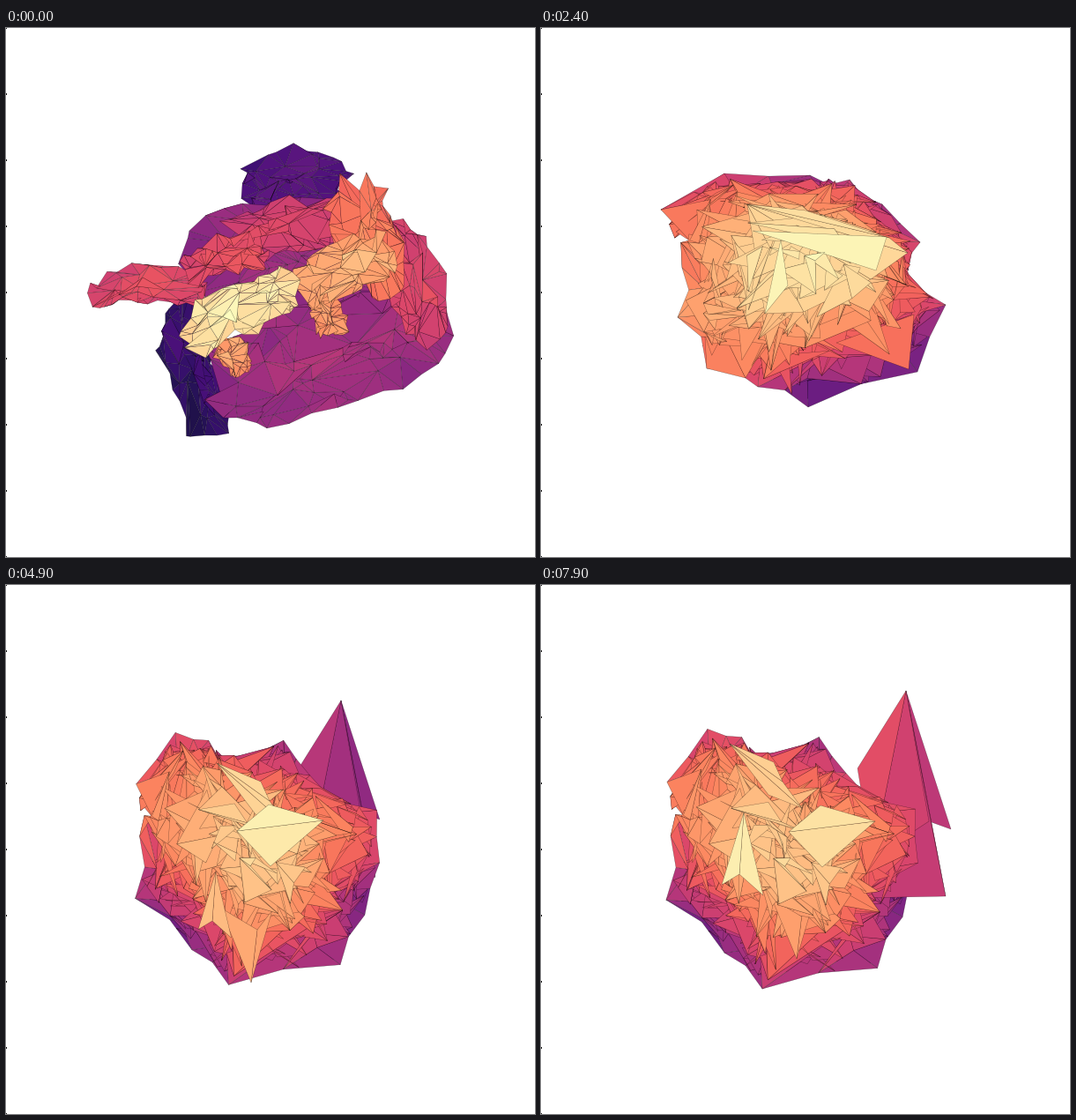
Recreate the animation shown at these times as a matplotlib script. Size 600x600 px, loop 8000 ms.

```python
import numpy as np
import matplotlib.pyplot as plt
from matplotlib.animation import FuncAnimation
from matplotlib.collections import PolyCollection
from matplotlib.tri import Triangulation

SIZE, FRAMES, STEP = 600, 80, 100
KEYS = [0, 7, 24, 39, 49, 63, 79]            # poses 0 to 6
SWELL = [.04, .19, .09, .03, .02, .03]       # bulge between poses
GOLDEN = 2.39996

# opening pose: level, half width, then start, control and end of a bent spine
RIDGES = [
    (.42, 66, 205, 272, 330, 232, 460, 285),
    (.26, 31, 272, 192, 325, 155, 388, 182),
    (.57, 31, 245, 258, 310, 212, 392, 222),
    (.62, 17, 204, 275, 250, 250, 300, 262),
    (.59, 31, 420, 225, 475, 270, 478, 352),
    (.72, 34, 395, 180, 405, 235, 437, 305),
    (.60, 19, 98, 310, 160, 272, 227, 305),
    (.19, 29, 200, 315, 200, 380, 240, 464),
    (.44, 60, 238, 415, 352, 365, 497, 340),
    (.95, 29, 207, 360, 270, 300, 332, 298),
    (.82, 31, 332, 298, 394, 270, 440, 252),
    (.79, 15, 248, 350, 255, 370, 272, 392),
    (.78, 17, 355, 310, 370, 325, 372, 347)]

# ball poses: bright hub, then 14 corners clockwise from the left; x, y, level
EARLY = [(285, 312, .73),
         (120, 242, .78), (150, 250, .7), (188, 218, .45), (250, 178, .4),
         (290, 155, .32), (345, 172, .38), (381, 205, .46), (425, 265, .2),
         (456, 315, .28), (410, 335, .4), (388, 415, .42), (310, 437, .25),
         (215, 428, .62), (140, 347, .72)]
MIDDLE = [(320, 255, .93),
          (136, 206, .55), (208, 165, .52), (305, 167, .38), (350, 172, .42),
          (387, 200, .42), (430, 243, .46), (420, 290, .5), (459, 314, .42),
          (427, 390, .18), (303, 430, .18), (246, 407, .45), (188, 386, .66),
          (155, 328, .74), (160, 272, .72)]
LATE = [(282, 312, .87),
        (146, 225, .58), (191, 166, .58), (229, 175, .55), (245, 193, .42),
        (315, 175, .42), (345, 215, .5), (422, 255, .5), (425, 315, .48),
        (408, 375, .2), (380, 432, .38), (252, 455, .36), (210, 415, .3),
        (145, 356, .26), (150, 285, .74)]

rng = np.random.default_rng(11)
verts, tris = [], []


def add(poses, faces):
    tris.append(faces + sum(v.shape[1] for v in verts))
    verts.append(np.stack(poses))


def on_ridge(z, level, width, *spine):
    """Lay the unit disk along a bent spine."""
    a, c, b = np.reshape(spine, (3, 2))
    t = ((z.real + 1) / 2)[:, None]
    mid = (1 - t) ** 2 * a + 2 * t * (1 - t) * c + t ** 2 * b
    along = (1 - t) * (c - a) + t * (b - c)
    normal = np.c_[-along[:, 1], along[:, 0]]
    normal /= np.linalg.norm(normal, axis=1, keepdims=True)
    full = np.maximum(1 - z.real ** 2, .05) ** .25
    xy = mid + normal * (z.imag / full * width)[:, None]
    return np.c_[xy, level + .05 * (.5 - abs(z) ** 2)]


def on_ball(z, ball, scale=1):
    """Stretch the unit disk to the corners; levels fall off from the hub."""
    ball = np.array(ball, float)
    hub, ring = ball[0], np.vstack([ball[1:], ball[1:2]])
    turn = np.angle(z) / (2 * np.pi) % 1 * (len(ring) - 1)
    rim = np.stack([np.interp(turn, np.arange(len(ring)), col) for col in ring.T], 1)
    r = abs(z)[:, None]
    xy = hub[:2] + (rim - hub)[:, :2] * r
    level = hub[2] + (rim - hub)[:, 2:] * r ** 1.7
    return np.c_[300 + (xy - 300) * scale, level]


def patch(i, ridge):
    """One ridge that later becomes a crumpled piece of the ball."""
    whole = i == 0
    rim, n = 28, 70 if whole else int(14 + ridge[1] * .8)
    z = np.r_[np.exp(2j * np.pi * np.arange(rim) / rim),
              np.sqrt(rng.uniform(0, .9, n)) * np.exp(2j * np.pi * rng.random(n))]
    faces = Triangulation(z.real, z.imag).triangles
    noise = rng.standard_t(4, (len(z), 2))
    tint = rng.normal(0, .05, len(z))

    start = on_ridge(z, *ridge)
    start[:, :2] += noise * min(4, ridge[1] / 6)
    start[:, 2] += tint * .6

    home = 0 if whole else .8 * np.sqrt(i / len(RIDGES)) * np.exp(1j * GOLDEN * i)
    w = home + z * (1 if whole else .5) + .1 * (noise @ [1, 1j])
    w *= np.minimum(1, rng.uniform(.8, .98, len(w)) / abs(w))
    if whole:
        w[:rim] = z[:rim]
        w[1:rim:2] *= rng.uniform(.85, 1, rim // 2)
    poses = [on_ball(w, EARLY), on_ball(w, MIDDLE)]
    poses += [on_ball(w, LATE, s) for s in (.97, .99, 1, 1.02)]
    lift = rng.normal(0, .03) + tint
    for p in poses:
        p[:, 2] += lift
    add([start] + poses, faces)


def blade(shape, spread, spots):
    """Facets fanned from a tip; spots give pose: (x, y, scale, level)."""
    shape = np.array([(0, 0)] + shape, float)
    i = np.arange(1, len(shape) - 1)
    fan = np.linspace(spread, -spread, len(shape))
    poses = []
    for k in range(len(KEYS)):
        near = min(spots, key=lambda j: abs(j - k))
        x, y, scale, level = spots[near]
        scale *= near == k
        poses.append(np.c_[shape * scale + (x, y), level + fan])
    add(poses, np.c_[0 * i, i, i + 1])


for i, ridge in enumerate(RIDGES):
    patch(i, ridge)

# great spike on the right and the facet under it
SPIKE = {3: (384, 148, .75, .41), 4: (380, 131, .86, .43),
         5: (410, 138, .93, .46), 6: (414, 120, 1, .54)}
blade([(-55, 88), (-38, 190), (26, 148), (51, 157)], .14, SPIKE)
blade([(28, 148), (45, 233), (-59, 235)], .02, SPIKE)
# pale blades in front
blade([(50, 21), (60, 43), (82, 73), (44, 58)], .02,
      {3: (218, 212, 1, .88), 4: (239, 202, 1, .91),
       5: (238, 182, 1, .89), 6: (214, 180, 1, .89)})
blade([(-62, -18), (-98, 12), (-60, 52)], .03,
      {3: (376, 276, 1, .96), 4: (360, 267, 1, .96),
       5: (338, 275, .8, .94), 6: (379, 268, 1, .93)})
blade([(-25, 82), (-5, 70), (22, 94)], .02,
      {3: (213, 320, .8, .84), 4: (238, 325, .8, .86),
       5: (235, 285, 1, .93), 6: (230, 258, 1, .96)})
blade([(-35, -85), (7, -60), (24, -82)], .03,
      {3: (250, 430, 1, .81), 4: (278, 451, 1, .81),
       5: (275, 463, 1, .8), 6: (290, 424, .8, .79)})
# large early facets
blade([(98, -14), (114, -76)], .01, {1: (285, 374, 1, .99)})
blade([(29, -43), (66, -25), (24, 15)], .02, {1: (301, 325, 1, .82)})
blade([(25, -5), (42, 87)], .02, {1: (120, 240, 1, .78)})
blade([(98, 0), (33, 83), (-12, 88)], .03, {1: (252, 233, 1, .7)})
blade([(152, 7), (140, 45)], .01, {2: (240, 230, 1, .98)})
blade([(18, -84), (26, -32)], .01, {2: (254, 324, 1, .98)})
blade([(66, 7), (161, 38), (182, 55), (140, 85), (64, 122), (20, 124)], .03,
      {2: (234, 200, 1, .91)})
blade([(79, 48), (49, 100), (5, 89)], .03, {2: (183, 297, 1, .74)})
blade([(-6, 62), (-88, 32)], .01, {2: (423, 325, 1, .7)})
blade([(72, -41), (110, 20), (44, 25)], .02, {2: (136, 206, 1, .58)})

poses = np.concatenate(verts, axis=1)
faces = np.concatenate(tris)

fig = plt.figure(figsize=(SIZE / 100, SIZE / 100), dpi=100, facecolor="white")
ax = fig.add_axes([0, 0, 1, 1])
ax.set(xlim=(0, SIZE), ylim=(SIZE, 0))
ax.axis("off")
ax.hlines(np.arange(0, SIZE + 1, 75), -1, 1, color="black", lw=1.3)
mesh = PolyCollection([], edgecolors=(0, 0, 0, .5), linewidths=.28)
ax.add_collection(mesh)
magma = plt.get_cmap("magma")


def draw(i):
    seg = min(np.searchsorted(KEYS, i, side="right") - 1, len(KEYS) - 2)
    u = (i - KEYS[seg]) / (KEYS[seg + 1] - KEYS[seg])
    now = poses[seg] * (1 - u) + poses[seg + 1] * u
    swell = 1 + SWELL[seg] * np.sin(np.pi * u)
    xy = 300 + (now[:, :2] - 300) * swell
    level = now[faces, 2].mean(1)
    p = xy[faces]
    a, b = p[:, 1] - p[:, 0], p[:, 2] - p[:, 0]
    seen = np.flatnonzero(abs(a[:, 0] * b[:, 1] - a[:, 1] * b[:, 0]) > 1)
    order = seen[np.argsort(level[seen], kind="stable")]
    mesh.set_verts(p[order])
    mesh.set_facecolor(magma(np.clip(level[order], .12, 1)))
    return mesh,


anim = FuncAnimation(fig, draw, frames=FRAMES, interval=STEP, repeat=True,
                     repeat_delay=0, blit=False)
plt.show()
```
